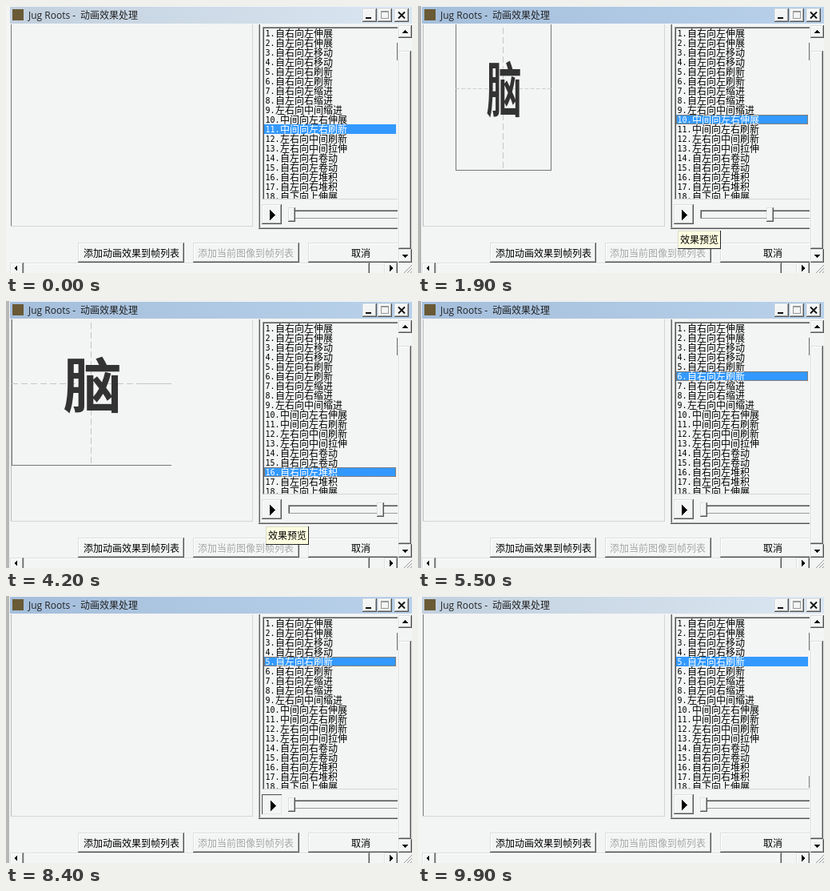
Write an HTML page that moves like this. It is 508x334 px and loops after 10 s.

```html
<!DOCTYPE html>
<html lang="zh-CN">
<head>
<meta charset="utf-8">
<title>动画效果处理</title>
<style>
html, body { margin: 0; width: 100%; height: 100%; overflow: hidden; background: #f3f4f4; }
svg { display: block; width: 508px; height: 334px; }
text { font: 12px "Noto Sans CJK SC", "Noto Sans CJK", "Noto Sans CJK JP", sans-serif; white-space: pre; }
.num { font: 10px "DejaVu Sans Mono", monospace; }
.latin { font: 12px "Open Sans", sans-serif; }
.glyph { font-size: 73.5px; font-weight: 700; fill: #333; }
rect, line, path { shape-rendering: crispEdges; }
.soft { shape-rendering: auto; }
.thin { vector-effect: non-scaling-stroke; }
</style>
</head>
<body>
<svg id="stage" viewBox="0 0 508 334" xmlns="http://www.w3.org/2000/svg">
  <defs>
    <linearGradient id="active"><stop stop-color="#a4bedb"/><stop offset="1" stop-color="#b9d1ea"/></linearGradient>
    <linearGradient id="idle"><stop stop-color="#c2d0de"/><stop offset="1" stop-color="#dae6f1"/></linearGradient>
    <clipPath id="panelClip"><rect x="7" y="23" width="301" height="252"/></clipPath>
    <clipPath id="listClip"><rect x="323" y="28" width="166" height="213"/></clipPath>
    <clipPath id="showClip"><rect id="showRect" y="0" height="210"/></clipPath>
    <clipPath id="smearClip"><rect id="smearRect" y="0" height="210"/></clipPath>
    <g id="picture">
      <path class="thin" d="M.5 0V203M199.5 0V203M0 202.5H200" stroke="#777" fill="none"/>
      <path class="thin" d="M99.5 0V202" stroke="#c4c6c6" stroke-dasharray="8 4"/>
      <path d="M0 100.5H200" stroke="#c4c6c6" stroke-dasharray="8 4"/>
      <text class="glyph" x="101.5" y="129.5" text-anchor="middle">脑</text>
    </g>
  </defs>
  <g id="back"></g>
  <g clip-path="url(#panelClip)">
    <g transform="translate(7 3)">
      <g clip-path="url(#showClip)"><use id="show" href="#picture"/></g>
      <g id="smearBox" clip-path="url(#smearClip)"><use id="smear" href="#picture"/></g>
    </g>
  </g>
  <g id="front"></g>
</svg>
<script>
const NS = 'http://www.w3.org/2000/svg';
const $ = id => document.getElementById(id);
const back = $('back'), front = $('front');

function add(parent, tag, attrs, content) {
  const el = document.createElementNS(NS, tag);
  set(el, attrs);
  if (content) el.textContent = content;
  return parent.appendChild(el);
}
function set(el, attrs) {
  for (const key in attrs) el.setAttribute(key, attrs[key]);
}
const show = (el, on) => set(el, { display: on ? 'inline' : 'none' });
const box = (p, x, y, width, height, fill) => add(p, 'rect', { x, y, width, height, fill });
const path = (p, d, fill, stroke = 'none') => add(p, 'path', { d, fill, stroke });
const label = (p, x, y, str, fill = '#000', cls = '') => add(p, 'text', { x, y, fill, class: cls }, str);

// Classic raised frame
function raised(p, x, y, w, h, face = '#f3f4f4') {
  box(p, x, y, w, h, '#555');
  box(p, x, y, w - 1, h - 1, '#dcdede');
  box(p, x + 1, y + 1, w - 2, h - 2, '#a5a7a7');
  box(p, x + 1, y + 1, w - 3, h - 3, '#fff');
  box(p, x + 2, y + 2, w - 4, h - 4, face);
}

// Window and title bar
box(back, 0, 0, 508, 334, '#f3f4f4');
const edge = box(back, 0, 0, 4, 334, '#b6b8b8');
const bar = box(back, 5, 1, 503, 21, 'url(#idle)');
box(back, 8, 4, 14, 14, '#6a5a35');
label(back, 28, 16, 'Jug Roots -', '#222', 'latin');
label(back, 93, 16, '动画效果处理', '#222');
for (const x of [446, 465, 486]) raised(back, x, 3, 18, 17);
box(back, 450, 14, 7, 2, '#111');
path(back, 'M469.5 7V15.5H478.5V7', 'none', '#999');
box(back, 469, 6, 10, 2, '#999');
add(back, 'path', { d: 'M491 7.5L499 15.5M499 7.5L491 15.5', stroke: '#111', 'stroke-width': 1.8, class: 'soft' });

// Preview panel
const panelEdge = box(back, 6, 23, 1, 253, '#777');
box(back, 6, 275, 303, 1, '#d4d6d6');
box(back, 308, 23, 1, 253, '#d4d6d6');

// Effect list
box(front, 316, 23, 1, 255, '#aaa');
box(front, 317, 23, 1, 255, '#666');
box(front, 316, 277, 174, 1, '#aaa');
box(front, 316, 278, 174, 1, '#555');
path(front, 'M321.5 242V26.5H490', 'none', '#999');
path(front, 'M322.5 241V27.5H490', 'none', '#555');
box(front, 322, 241, 168, 1, '#d4d6d6');
box(front, 489, 46, 1, 22, '#666');
const listEdge = box(front, 489, 225, 1, 15, '#777');
const list = add(front, 'g', { 'clip-path': 'url(#listClip)' });
const mark = box(list, 323, 0, 165, 12, '#3399ff');
const focus = add(list, 'rect', {
  x: 323.5, width: 164, height: 11, fill: 'none', stroke: '#c60', 'stroke-dasharray': '1 1'
});
const names = ('自右向左伸展 自左向右伸展 自右向左移动 自左向右移动 自左向右刷新 自右向左刷新 ' +
  '自右向左缩进 自左向右缩进 左右向中间缩进 中间向左右伸展 中间向左右刷新 左右向中间刷新 ' +
  '左右向中间拉伸 自左向右卷动 自右向左卷动 自右向左堆积 自左向右堆积 自下向上伸展').split(' ');
const rows = names.map((name, i) => {
  const row = add(list, 'g', {}), num = `${i + 1}.`;
  add(row, 'text', { x: 324.5, y: 38 + 12 * i, class: 'num' }, num);
  add(row, 'text', { x: 325 + 6 * num.length, y: 39 + 12 * i }, name);
  return row;
});

// Play button and slider
raised(front, 320, 248, 25, 25);
const sunk = add(front, 'g', {});
box(sunk, 320, 248, 25, 25, '#555');
box(sunk, 321, 249, 24, 24, '#e4e6e6');
box(sunk, 322, 250, 22, 22, '#f3f4f4');
const arrow = path(front, 'M330 255L337 261.5L330 268Z', '#000');
box(front, 353, 255, 137, 11, '#999');
box(front, 354, 256, 136, 9, '#555');
box(front, 355, 257, 135, 8, '#f3f4f4');
const thumb = add(front, 'g', {});
raised(thumb, 353, 252, 9, 18);

// Bottom buttons; the last one runs under the scroll bar
for (const [x, w] of [[90, 133], [234, 133], [378, 130]]) raised(front, x, 296, w, 25);
label(front, 97, 313.5, '添加动画效果到帧列表');
label(front, 241, 314.5, '添加当前图像到帧列表', '#fff');
label(front, 240, 313.5, '添加当前图像到帧列表', '#a2a4a4');
label(front, 432, 313.5, '取消');

// Scroll bars
box(front, 490, 22, 18, 312, '#f3f4f4');
raised(front, 491, 24, 17, 16);
path(front, 'M495 34L499 30L503 34Z', '#000');
raised(front, 491, 56, 16, 248);
raised(front, 491, 304, 17, 17);
path(front, 'M495 311L503 311L499 315Z', '#000');
raised(front, 5, 321, 17, 17);
path(front, 'M10 328L14 324V332Z', '#000');
raised(front, 23, 321, 432, 17);
raised(front, 473, 321, 17, 17);
path(front, 'M484 328L480 324V332Z', '#000');
add(front, 'path', { d: 'M498 334L508 324M502 334L508 328M506 334L508 332', stroke: '#999', class: 'soft' });

// Tooltip
const tip = add(front, 'g', {});
box(tip, 0, 0, 54, 23, '#222');
box(tip, 0, 0, 53, 22, '#dcdcc8');
box(tip, 1, 1, 52, 21, '#ffffe1');
label(tip, 3, 16, '效果预览');

const LOOP = 10000;
const picks = [[0, 11], [600, 10], [2700, 16], [4800, 17], [5500, 6], [7500, 5]];
const runs = [
  { start: 1400, kind: 'stretch', tip: [325, 281] },
  { start: 3500, kind: 'stack', tip: [325, 282], press: 3300 },
  { start: 6300, kind: 'wipeLeft', tip: [332, 274] },
  { start: 8500, kind: 'wipeRight', tip: [332, 273], press: 8400 }
];

function drawPicture(kind, step) {
  const w = 20 * step;
  let x = 0, width = w, move = '';
  if (kind === 'stretch') {
    x = 100 - w / 2;
    move = `translate(${x} 0) scale(${step / 10} 1)`;
  }
  if (kind === 'wipeLeft') x = 200 - w;
  set($('showRect'), { x, width });
  set($('show'), { transform: move });
  const smeared = kind === 'stack' && step > 0;
  show($('smearBox'), smeared);
  if (smeared) {
    // The last visible column is pulled out to the right edge
    set($('smearRect'), { x: w, width: 200 - w });
    set($('smear'), { transform: `translate(${w - 200 * (w - 1)} 0) scale(200 1)` });
  }
}

function draw(t) {
  const idle = t < 600 || t >= 9900;
  set(bar, { fill: idle ? 'url(#idle)' : 'url(#active)' });
  show(edge, !idle);
  set(panelEdge, { fill: idle ? '#777' : '#bbb' });
  show(listEdge, t >= 9500);

  const pick = picks.filter(p => t >= p[0]).pop()[1];
  const y = 28 + 12 * (pick - 1);
  set(mark, { y });
  set(focus, { y: y + 0.5 });
  show(focus, !idle);
  rows.forEach((row, i) => set(row, { fill: i + 1 === pick ? '#fff' : '#000' }));

  const run = runs.find(r => t >= r.start && t < r.start + 900);
  const step = run ? Math.floor((t - run.start) / 100) + 1 : 0;
  show($('show'), step > 0);
  drawPicture(run && run.kind, step);
  set(thumb, { transform: `translate(${Math.round(13.85 * step)} 0)` });
  show(tip, step > 4);
  if (run) set(tip, { transform: `translate(${run.tip})` });

  const pressed = runs.some(r => t >= r.press && t < r.start);
  show(sunk, pressed);
  set(arrow, { transform: pressed ? 'translate(1 1)' : '' });
}

function tick() {
  draw(performance.now() % LOOP);
  requestAnimationFrame(tick);
}
tick();
</script>
</body>
</html>
```
